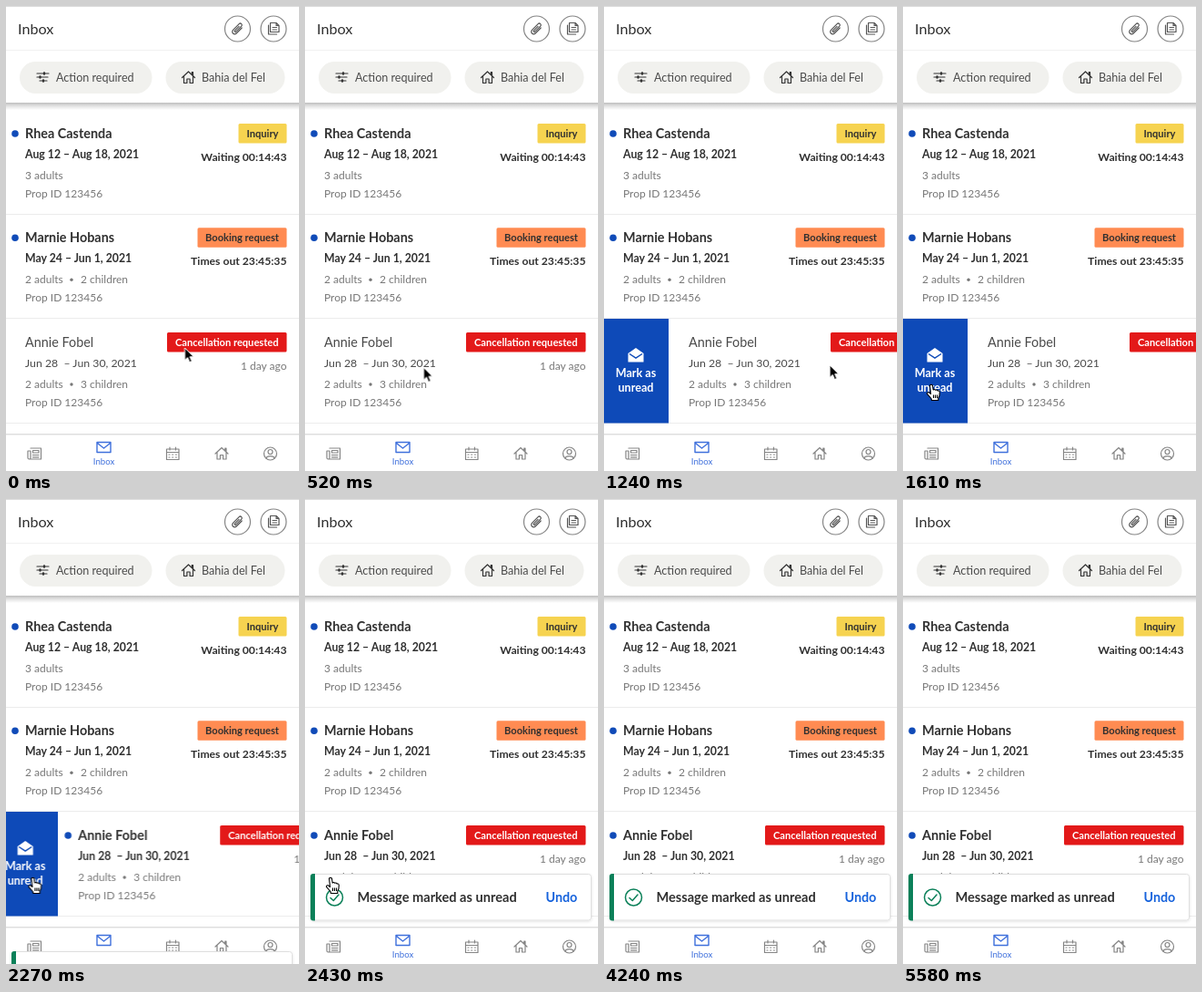
An HTML page that plays this animation: 322x510 px, repeating every 5.64 s.

```html
<!DOCTYPE html>
<html lang="en">
<head>
<meta charset="utf-8">
<title>Inbox</title>
<style>
html, body { margin: 0; width: 100%; height: 100%; overflow: hidden; background: #fff; }
svg { display: block; width: 100%; height: 100%; }
text { font-family: Lato, "Open Sans", sans-serif; font-size: 12.2px; fill: #303030; white-space: pre; }
.b { font-weight: 700; }
.name { font-size: 14.4px; }
.date { font-size: 12.3px; }
.soft { font-size: 12px; fill: #777; }
.pill { font-size: 12.6px; fill: #4a4a4a; }
.tag { font-size: 11.1px; font-weight: 700; }
.end { text-anchor: end; }
.mid { text-anchor: middle; }
.line { fill: none; stroke: #555; stroke-width: 1.2; stroke-linecap: round; stroke-linejoin: round; }
.ring { stroke: #858585; }
.nav { stroke: #858585; }
.rule { stroke: #ececec; }
.dot { fill: #104bb8; }
</style>
</head>
<body>
<svg viewBox="0 0 322 510" preserveAspectRatio="none">
  <defs>
    <linearGradient id="shade" x2="0" y2="1">
      <stop offset="0" stop-color="#bdbdbd"/>
      <stop offset=".4" stop-color="#dedede"/>
      <stop offset="1" stop-color="#fff"/>
    </linearGradient>
    <filter id="drop" x="-5%" y="-20%" width="110%" height="140%">
      <feDropShadow dx="0" dy="1" stdDeviation="1.5" flood-opacity=".12"/>
    </filter>
    <path id="house" d="M-7 0 L0-6.5 L7 0 M-5-1.5V6H-1.6V1.5H1.6V6H5V-1.5 M3.8-3.2V-6H5V-2"/>
  </defs>
  <rect width="322" height="510" fill="#fff"/>

  <g id="list"></g>

  <g id="row">
    <rect x="-72" y="343" width="71" height="114.5" fill="#0e4ab8"/>
    <g transform="translate(-37 383)">
      <path d="M-8.5-2 L0-8 L8.5-2V7.5H-8.5Z" fill="#fff"/>
      <path d="M-7-1.5 L0 3.2 L7-1.5" fill="none" stroke="#0e4ab8" stroke-width="1.5"/>
    </g>
    <g class="b mid">
      <text x="-37" y="407" style="fill:#fff;font-size:12.6px">Mark as</text>
      <text x="-37" y="423" style="fill:#fff;font-size:12.6px">unread</text>
    </g>
    <g id="read">
      <text class="name" x="21" y="374" style="fill:#4a4a4a">Annie Fobel</text>
      <text class="date" x="21" y="395.5" style="fill:#4a4a4a">Jun 28  – Jun 30, 2021</text>
    </g>
    <g id="unread">
      <circle class="dot" cx="10" cy="369" r="3.8"/>
      <text class="name b" x="21" y="374">Annie Fobel</text>
      <text class="date b" x="21" y="395.5">Jun 28  – Jun 30, 2021</text>
    </g>
    <g id="details"></g>
  </g>

  <g id="header">
    <path d="M0 .5H322" stroke="#dcdcdc"/>
    <path d="M0 48.5H322" stroke="#f1f1f1"/>
    <rect y="106" width="322" height="8" fill="url(#shade)"/>
    <text x="13" y="31" style="font-size:16.2px">Inbox</text>
    <g class="line">
      <circle class="ring" cx="254.5" cy="25" r="14"/>
      <circle class="ring" cx="294" cy="25" r="14"/>
      <path transform="translate(254.5 25) rotate(45)" d="M2.6-4V4.5A2.6 2.6 0 0 1-2.6 4.5V-5A1.8 1.8 0 0 1 1-5V3.5A.8 .8 0 0 1-.8 3.5V-3"/>
      <path d="M290.5 18.5H297L300 21.5V28.5H290.5ZM297 18.5V21.5H300M288.5 21V31H297.5M293 23.5H297.5M293 26H297.5"/>
    </g>
    <rect x="15" y="61" width="145.5" height="35" rx="17.5" fill="#f1f1ee"/>
    <rect x="175.5" y="61" width="131" height="35" rx="17.5" fill="#f1f1ee"/>
    <g class="line" style="stroke:#333">
      <path d="M34 74H47M34 78H46M37 82H45"/>
      <path d="M42 73.5V74.5M37.5 77.5V78.5M41 81.5V82.5" stroke-width="2.4"/>
      <use href="#house" x="200.5" y="78.5"/>
    </g>
    <text class="pill" x="55" y="82.5">Action required</text>
    <text class="pill" x="215" y="82.5">Bahia del Fel</text>
  </g>

  <g id="tabs">
    <rect y="470" width="322" height="40" fill="#fff"/>
    <path d="M0 469.5H322" stroke="#dedede"/>
    <path d="M0 470.5H322" stroke="#f0f0f0"/>
    <g class="line nav">
      <path d="M27 485H38.5V497H25.5A1.5 1.5 0 0 1 24 495.5V488H27V495.5A1.5 1.5 0 0 1 25.5 497M29.5 487.5H36V490H29.5ZM29.5 492.5H36M29.5 494.8H36"/>
      <path d="M176.5 486H190V497.5H176.5ZM176.5 489.5H190M180 484V487M186.5 484V487"/>
      <path d="M179 492H187.5M179 495H187.5" stroke-dasharray="1 2.7"/>
      <use href="#house" x="237" y="491"/>
      <circle cx="290.5" cy="491" r="7"/>
      <circle cx="290.5" cy="489" r="2.5"/>
      <path d="M285.8 496C287 492.8 294 492.8 295.2 496"/>
    </g>
    <path class="line" style="stroke:#3f70dc;stroke-width:1.4" d="M100 478.5H115V489.5H100ZM100.5 479.5L107.5 485L114.5 479.5"/>
    <text class="mid" x="107.5" y="503" style="font-size:9.6px;fill:#3f70dc">Inbox</text>
  </g>

  <g id="toast">
    <rect x="6.5" y="411.5" width="308" height="50.5" rx="3" fill="#fff" stroke="#dfdfdf" filter="url(#drop)"/>
    <path d="M11 411V462.5H9A3 3 0 0 1 6 459.5V414A3 3 0 0 1 9 411Z" fill="#0b8059"/>
    <g class="line" style="stroke:#0b8059;stroke-width:1.5">
      <circle cx="32.5" cy="437" r="9"/>
      <path d="M28 437.5L31.3 440.5L37 434"/>
    </g>
    <text class="b" x="57.5" y="442" style="font-size:14.6px">Message marked as unread</text>
    <text class="b" x="264.5" y="442" style="font-size:14.3px;fill:#1763dc">Undo</text>
  </g>

  <g id="cursor" stroke-linejoin="round">
    <path id="arrow" d="M0 0V13.5L3.2 10.6L5.3 15.6L7.7 14.6L5.6 9.8H9.8Z" fill="#000" stroke="#fff"/>
    <path id="hand" d="M-1.5 1.2Q0-.8 1.5 1.2L2.2 6Q3.8 4.8 4.6 6.3Q6.3 5.4 7 7Q9 6.5 9.3 8.5L9 12.5L7.8 15V17.5H.5L0 15.5L-4.5 10.3Q-4.5 8.3-2.5 8.8L-.4 10.5ZM2.5 11.5V15M4.5 11.5V15M6.5 11.5V15" fill="#fff" stroke="#000" stroke-width="1.1"/>
  </g>
</svg>
<script>
const LOOP = 5640;
const $ = id => document.getElementById(id);

const text = (x, y, cls, s, fill = "") =>
  `<text x="${x}" y="${y}" class="${cls}"${fill && ` style="fill:${fill}"`}>${s}</text>`;
const tag = (x, y, color, s, ink = "#303030") =>
  `<rect x="${x}" y="${y - 11}" width="${308.5 - x}" height="21.5" rx="1.5" fill="${color}"/>` +
  text((x + 308.5) / 2, y + 3.8, "tag mid", s, ink);
const rule = y => `<path class="rule" d="M0 ${y}H322"/>`;

// Lower lines of a message whose title is centred on y
function details(y, adults, children) {
  let out = text(21, y + 50, "soft", adults) + text(21, y + 69.8, "soft", "Prop ID 123456");
  if (children) out += `<circle cx="72" cy="${y + 46}" r="1.7" fill="#777"/>` + text(82, y + 50, "soft", children);
  return out;
}

function message(y, name, dates, color, label, tagX, status, adults, children) {
  return `<circle class="dot" cx="10" cy="${y}" r="3.8"/>` +
    text(21, y + 5, "name b", name) + text(21, y + 26.7, "date b", dates) +
    tag(tagX, y, color, label) + text(308.5, y + 30, "b end", status) +
    details(y, adults, children);
}

$("list").innerHTML =
  message(140, "Rhea Castenda", "Aug 12 – Aug 18, 2021", "#f6d350", "Inquiry", 255.5, "Waiting 00:14:43", "3 adults") +
  message(254.3, "Marnie Hobans", "May 24 – Jun 1, 2021", "#ff8b52", "Booking request", 210.5, "Times out 23:45:35", "2 adults", "2 children") +
  [228.5, 342.5, 457.5].map(rule).join("");
$("details").innerHTML =
  tag(177, 369, "#e31919", "Cancellation requested", "#fff") +
  text(308.5, 399, "soft end", "1 day ago") + details(369, "2 adults", "3 children");

// Steps are [ms, value, easing to the next step]
function play(id, prop, steps) {
  const frames = steps.map(([t, v, easing = "linear"]) => ({ offset: t / LOOP, [prop]: v, easing }));
  frames.push({ offset: 1, [prop]: steps[steps.length - 1][1] });
  $(id).animate(frames, { duration: LOOP, iterations: Infinity }).startTime = 0;
}
const at = (x, y) => `translate(${x}px, ${y}px)`;
const show = (id, from, to = LOOP) => play(id, "opacity", [
  [0, from ? 0 : 1, "step-end"],
  ...(from ? [[from, 1, "step-end"]] : []),
  ...(to < LOOP ? [[to, 0, "step-end"]] : [])
]);

play("cursor", "transform", [
  [0, at(196.5, 375), "ease-in-out"],
  [580, at(129, 397), "ease-in-out"],
  [760, at(255, 391.5), "ease-out"],
  [970, at(267, 392)],
  [1150, at(267, 392), "ease-in-out"],
  [1610, at(31, 415), "ease-out"],
  [1730, at(29.5, 415)],
  [2240, at(29.5, 415), "ease-in"],
  [2430, at(28, 415), "ease-in"],
  [2790, at(-20, 424)]
]);
play("row", "transform", [
  [0, at(0, 0)],
  [590, at(0, 0), "ease-in-out"],
  [755, at(72, 0)],
  [2250, at(72, 0), "ease-out"],
  [2425, at(0, 0)]
]);
play("toast", "transform", [
  [0, at(0, 105)],
  [2250, at(0, 105), "ease-out"],
  [2425, at(0, 0)]
]);
show("read", 0, 2260);
show("unread", 2260);
show("toast", 2250);
show("arrow", 0, 1500);
show("hand", 1500, 2790);
</script>
</body>
</html>
```
